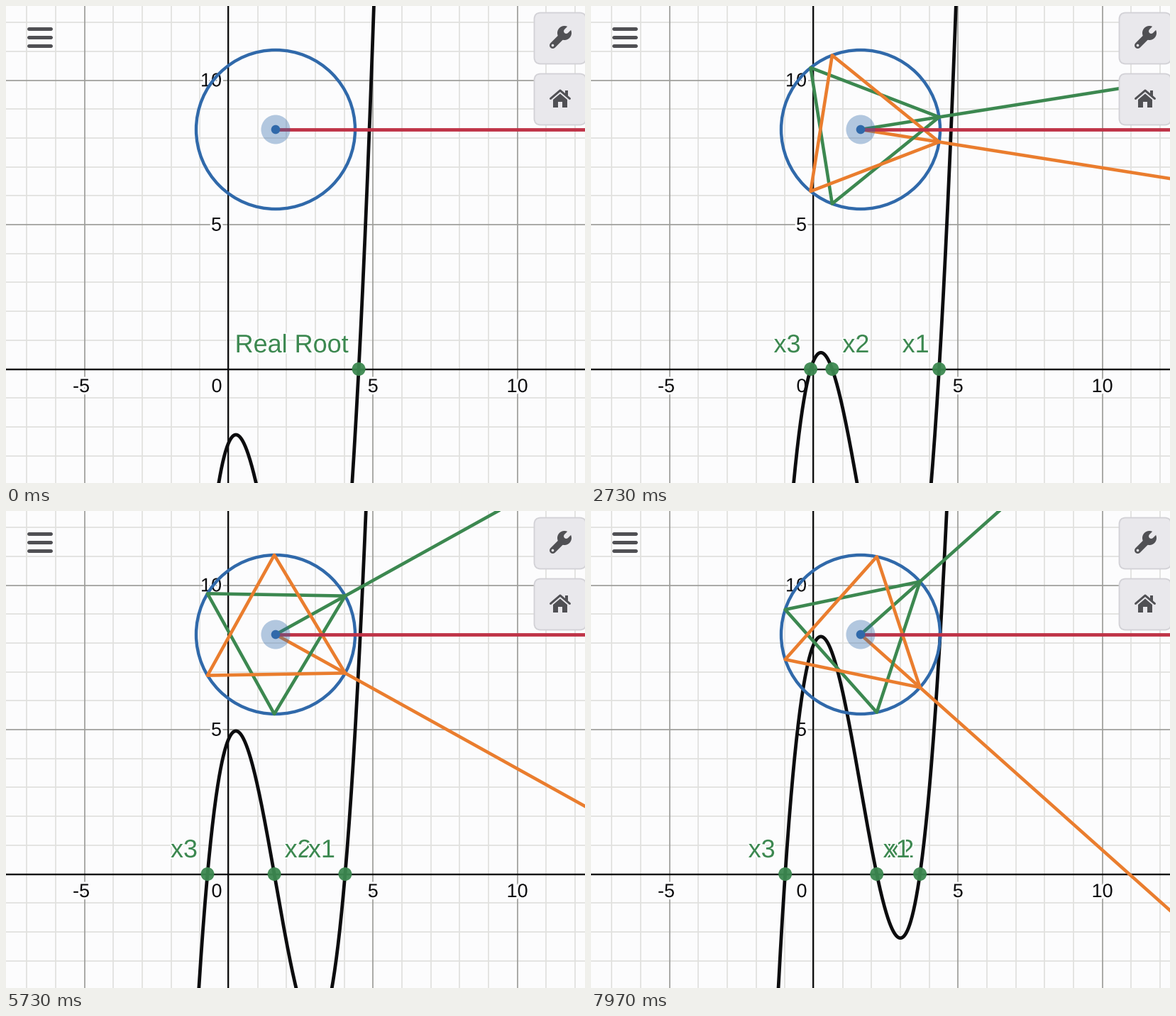
Write a matplotlib script that moves like this. It is 816x672 px and loops after 8000 ms.

```python
import numpy as np
import matplotlib.pyplot as plt
from matplotlib.animation import FuncAnimation
from matplotlib.patches import Circle, FancyBboxPatch, Polygon, Rectangle
from matplotlib.patheffects import withStroke

W, H, DPI = 816, 672, 100
PT = 72 / DPI
FRAMES, INTERVAL = 250, 32

OX, OY, UNIT = 313.9, 511.5, 40.67      # origin and unit length in pixels
CX, CY, RAD = 380, 174, 112             # circle of the roots
R = RAD / UNIT
PEAK = R ** 3 / 4                       # local maximum of u^3 - 3/4 R^2 u

PAPER, INK = "#fcfcfd", "#0c0c0e"
MINOR, MAJOR = "#e1e1de", "#9d9d9a"
GREEN, ORANGE, RED, BLUE = "#3c8850", "#ea7d2e", "#bf3347", "#3069aa"
BUTTON, EDGE, ICON = "#e9e8ec", "#d2d1d6", "#505054"


def line(color, width, z, xs=(), ys=()):
    return ax.plot(xs, ys, color=color, lw=width * PT, zorder=z,
                   solid_capstyle="round", solid_joinstyle="round")[0]


def text(x, y, s, px, color, z, halo):
    return ax.text(x, y, s, family="Liberation Sans", fontsize=px * PT,
                   color=color, zorder=z, ha="left", va="baseline",
                   path_effects=[withStroke(linewidth=halo * PT, foreground=PAPER)])


def disc(x, y, r, color, z, alpha=1):
    return ax.add_patch(Circle((x, y), r, fc=color, lw=0, zorder=z, alpha=alpha))


def draw_grid():
    for k in range(-12, 13):
        major = k % 5 == 0
        style = dict(color=MAJOR if major else MINOR, lw=1.7 * PT,
                     zorder=2 if major else 1)
        x, y = OX + k * UNIT, OY - k * UNIT
        ax.axvline(x, **style)
        ax.axhline(y, **style)
        if major and abs(k) <= 10:
            half = 7.5 * len(str(abs(k)))
            left = 289.5 if k == 0 else x - half - 9 * (k < 0)
            text(left, 544, str(k), 27, INK, 3, 6)
            if k > 0:
                text(304 - 2 * half, y + 8.5, str(k), 27, INK, 3, 6)
    ax.axvline(313, color=INK, lw=2 * PT, zorder=4)
    ax.axhline(OY, color=INK, lw=2.4 * PT, zorder=4)


def draw_buttons():
    for n in range(3):
        line(ICON, 5, 20, [31.5, 62.5], [32 + 12.2 * n] * 2)
    for y in (9.5, 95.5):
        ax.add_patch(FancyBboxPatch((744.5, y), 73, 72, fc=BUTTON, ec=EDGE,
                                    boxstyle="round,pad=0,rounding_size=9",
                                    lw=1.8 * PT, zorder=20))
    # wrench
    line(ICON, 9, 21, [770.5, 785], [55.5, 41])
    disc(787, 38, 10, ICON, 21)
    line(BUTTON, 7, 22, [789.5, 799], [35.5, 26])
    disc(770.5, 55.5, 1.8, BUTTON, 22)
    # house
    line(ICON, 3, 21, [767.5, 781, 794.5], [130.5, 119, 130.5])
    ax.add_patch(Polygon([(771, 143), (771, 132), (781, 123.5), (791, 132), (791, 143)],
                         fc=ICON, lw=0, zorder=21))
    ax.add_patch(Rectangle((787.5, 118.5), 4, 8, fc=ICON, lw=0, zorder=21))
    ax.add_patch(Rectangle((778, 135), 6, 8.5, fc=BUTTON, lw=0, zorder=22))


fig = plt.figure(figsize=(W / DPI, H / DPI), dpi=DPI, facecolor=PAPER)
ax = fig.add_axes([0, 0, 1, 1])
ax.set_xlim(0, W)
ax.set_ylim(H, 0)
ax.axis("off")

draw_grid()
draw_buttons()

ax.add_patch(Circle((CX, CY), RAD, fill=False, ec=BLUE, lw=4.4 * PT, zorder=6))
curve = line(INK, 4.8, 5)
rays = [line(c, 4.6, 7) for c in (GREEN, ORANGE)]
triangles = [line(c, 4.6, 8) for c in (GREEN, ORANGE)]
line(RED, 4.8, 9, [CX, W + 9], [CY, CY])
disc(CX, CY, 20.5, BLUE, 10, alpha=0.36)
disc(CX, CY, 6.3, BLUE, 11)

dots = [disc(0, OY, 9.5, GREEN, 12, alpha=0.95) for _ in range(3)]
single = text(0, 488, "Real Root", 36, GREEN, 15, 4)
names = [text(0, 488, f"x{n}", 36, GREEN, 16 - n, 4) for n in (1, 2, 3)]
SHIFTS = (-52, 14.5, -52)

px = np.linspace(200, 600, 801)
u = (px - CX) / UNIT
BASE = u ** 3 - 0.75 * R ** 2 * u


def peak_height(t):
    """Height of the local maximum: speeds up, then rises steadily."""
    a = min(t, 5.73)
    return -2.275 + 0.85 * a + 0.072 * a ** 2 + 1.46 * (t - a)


def update(i):
    top = peak_height(i * INTERVAL / 1000)
    d = top - PEAK
    py = OY - UNIT * (BASE + d)
    curve.set_data(px, np.where(abs(py - H / 2) < H, py, np.nan))

    three = top >= 0
    for art in rays + triangles + names + dots[1:]:
        art.set_visible(three)
    single.set_visible(not three)

    if not three:
        x = CX + RAD * np.cosh(np.arccosh(-d / PEAK) / 3)
        dots[0].center = x, OY
        single.set_x(x - 174.5)
        return

    theta = np.arccos(np.clip(-d / PEAK, -1, 1)) / 3
    corners = theta + np.radians([0, 240, 120, 0])
    for sign, ray, tri in zip((-1, 1), rays, triangles):
        ray.set_data([CX, CX + 900 * np.cos(theta)],
                     [CY, CY + sign * 900 * np.sin(theta)])
        tri.set_data(CX + RAD * np.cos(corners),
                     CY + sign * RAD * np.sin(corners))
    for a, dot, name, shift in zip(corners, dots, names, SHIFTS):
        x = CX + RAD * np.cos(a)
        dot.center = x, OY
        name.set_x(x + shift)


anim = FuncAnimation(fig, update, frames=FRAMES, init_func=lambda: update(0),
                     interval=INTERVAL, repeat=True, repeat_delay=0, blit=False)
plt.show()
```
